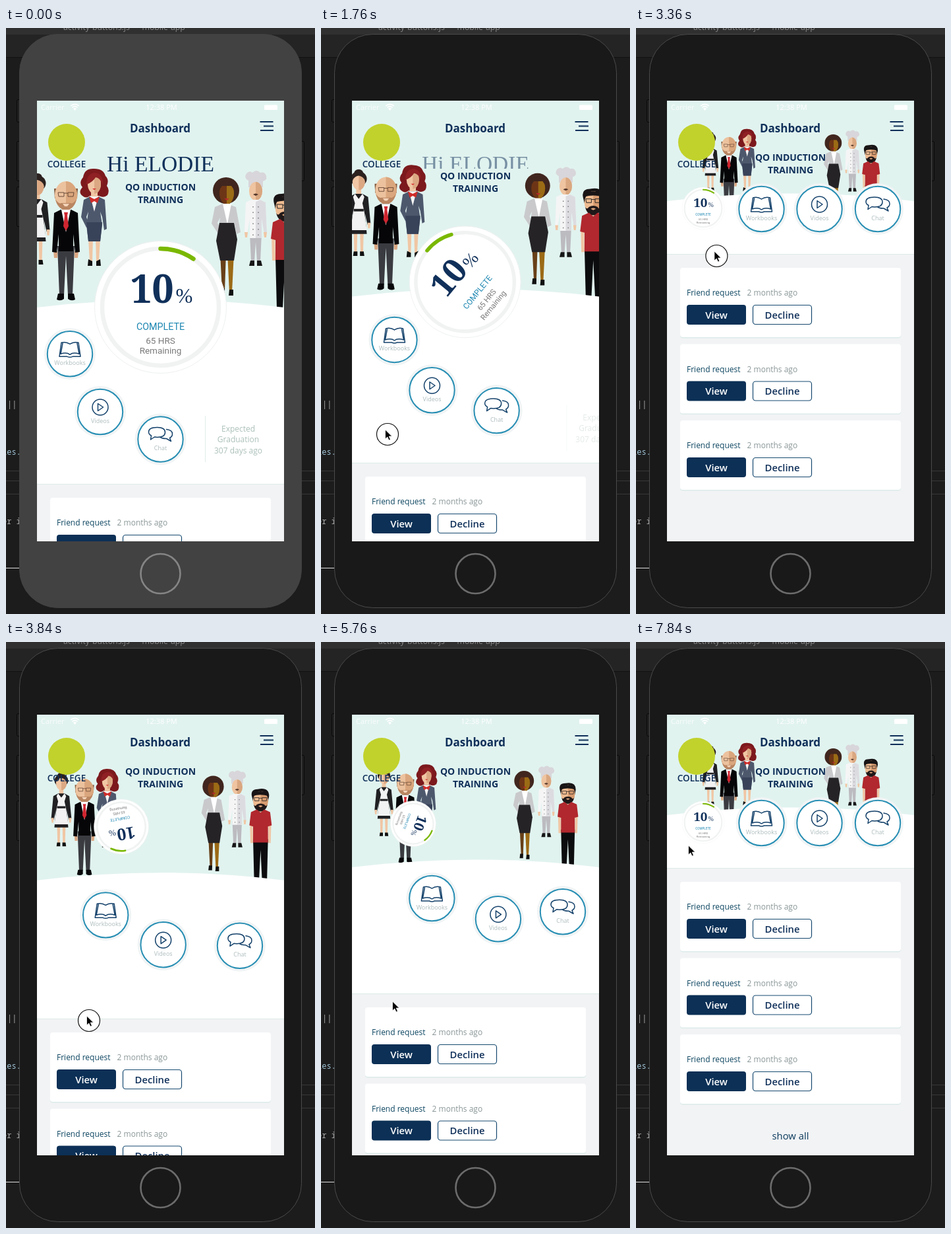
These frames come from a looping animation (469 px wide and 887 px high, 8000 ms). An HTML page:

```html
<!DOCTYPE html>
<html lang="en">
<head>
<meta charset="utf-8">
<title>Collapsing dashboard header</title>
<style>
html, body { margin: 0; width: 100%; height: 100%; overflow: hidden; background: #1c1c1c; }
svg { display: block; width: 100vw; height: 100vh; font-family: "Open Sans", "Noto Sans", sans-serif; }
.mid { text-anchor: middle; }
.navy { fill: #10305a; }
.bold { font-weight: 700; }
.mono { font: 12px "Noto Sans Mono", monospace; fill: #aaa; }
.serif { font-family: "Liberation Serif", serif; }
.digits { font-family: "Noto Serif", serif; }
.plain { font-family: Roboto, sans-serif; }
.line { fill: none; stroke: #15426b; stroke-width: 1.5; stroke-linejoin: round; stroke-linecap: round; }
</style>
</head>
<body>
<svg viewBox="0 0 469 887" preserveAspectRatio="none">
  <defs>
    <clipPath id="screen"><path d="M47 110h375v667H47z"/></clipPath>
    <clipPath id="greetClip"><rect id="greetRect" x="47" y="180" width="375" height="50"/></clipPath>
  </defs>

  <!-- editor window behind the phone -->
  <path fill="#1c1c1c" d="M0 0h469v887H0z"/>
  <path fill="#303030" d="M0 0h469v10H0z"/>
  <path fill="#242424" d="M0 10h469v34H0z"/>
  <path stroke="#111" d="M0 44.5h469"/>
  <path stroke="#383838" d="M0 670.5h469M0 685.5h469M0 705.5h469"/>
  <path stroke="#ddd" d="M0 817.5h21"/>
  <text x="87" y="2.500" font-size="12.300" fill="#888">activity-buttons.js — mobile-app</text>
  <g class="mono"><text x="2" y="574">||</text><text x="-6" y="646" fill="#9fc3d6">les.</text><text x="-6" y="751">er i</text></g>

  <!-- phone -->
  <g fill="#202020" stroke="#080808">
    <rect x="16.5" y="108.5" width="8" height="34" rx="2"/><rect x="16.5" y="171.5" width="8" height="60" rx="2"/>
    <rect x="16.5" y="240.5" width="8" height="60" rx="2"/><rect x="444.5" y="171.5" width="8" height="60" rx="2"/>
  </g>
  <rect id="bezel" x="20.5" y="9.5" width="428" height="868" rx="58"/>
  <circle id="home" cx="234.5" cy="826" r="30" fill="none" stroke-width="2.6"/>

  <g clip-path="url(#screen)">
    <path fill="#e1f3ef" d="M47 110h375v667H47z"/>
    <g id="left"></g>
    <g id="right"></g>
    <path id="hill" fill="#fff" d="M47 0Q234.5-23 422 0V700H47z"/>

    <g fill="#fff" font-size="11">
      <text x="53" y="124" opacity=".8">Carrier</text>
      <text x="236" y="124" class="mid">12:38 PM</text>
      <rect x="392" y="116.500" width="20" height="7.500" rx="1.500"/>
      <path d="M104.500 125l-2.500-3q2.500-2 5 0z"/>
      <path fill="none" stroke="#fff" stroke-width="1.700" d="M100.500 120.300q4-3.300 8 0M98.300 117.800q6.200-5 12.400 0"/>
    </g>
    <circle cx="92" cy="173" r="28" fill="#c1d22c"/>
    <text x="92" y="211" class="mid navy" font-size="13.500" font-weight="600">COLLEGE</text>
    <text x="234" y="158" class="mid navy bold" font-size="17">Dashboard</text>
    <path stroke="#10305a" stroke-width="2.200" d="M385.500 142h20M391 148.500h15M386 155h20"/>
    <g clip-path="url(#greetClip)"><text id="greet" x="234.500" y="217" class="mid navy serif" font-size="33.500">Hi ELODIE</text></g>
    <g id="course" class="mid navy bold" font-size="14"><text x="234.500" y="246">QO INDUCTION</text><text x="234.500" y="265">TRAINING</text></g>

    <g id="graduation" class="mid" font-size="12" fill="#abc0ba">
      <path stroke="#e0edea" d="M302.500 587v70"/>
      <text x="352.500" y="611">Expected</text><text x="352.500" y="627">Graduation</text><text x="352.500" y="644">307 days ago</text>
    </g>

    <g id="list">
      <path fill="#f2f3f5" d="M47 0h375v900H47z"/>
      <path stroke="#dcebe8" d="M47 .5h375"/>
      <g id="cards"></g>
      <text id="showAll" x="234.500" y="411" class="mid" font-size="14.800" fill="#0b3a5c">show all</text>
    </g>

    <g id="ring" class="mid">
      <circle r="100" fill="#fff" stroke="#eef0f0"/>
      <circle r="88.500" fill="none" stroke="#f1f2f2" stroke-width="6.500"/>
      <path d="M0-88.500A88.500 88.500 0 0 1 50-73" fill="none" stroke="#7ab800" stroke-width="6.500" stroke-linecap="round"/>
      <text x="-13" y="-7" class="navy bold digits" font-size="59">10</text>
      <text x="36" y="-7" class="navy serif" font-size="31">%</text>
      <g class="plain" fill="#7a7a7a" font-size="13.500">
        <text y="34" font-size="14.300" fill="#1c86b1">COMPLETE</text>
        <text y="55">65 HRS</text><text y="70.500">Remaining</text>
      </g>
    </g>
    <g id="icons"></g>
  </g>

  <g id="cursor">
    <circle id="press" r="16.500" fill="#fff" stroke="#111" stroke-width="1.200"/>
    <path d="M-3.500-7v14l3.300-3 2.300 5 2.300-1-2.200-4.900h4.500z" fill="#000" stroke="#fff" stroke-width=".8"/>
  </g>
</svg>

<script>
const $ = id => document.getElementById(id);
const shape = (fill, d) => `<path fill="${fill}" d="${d}"/>`;
const oval = (fill, x, y, rx, ry = rx) => `<ellipse cx="${x}" cy="${y}" rx="${rx}" ry="${ry}" fill="${fill}"/>`;
const person = (x, ...parts) => `<g transform="translate(${x})">${parts.join('')}</g>`;
const glasses = (y, color) => `<path fill="none" stroke="${color}" d="M-12 ${y}h9v6h-8zM12 ${y}h-9v6h8zM-3 ${y + 1}h6"/>`;
const face = (y, rx, ry, light, dark) => oval(light, 0, y, rx, ry) + shape(dark, `M0 ${y - ry}a${rx} ${ry} 0 0 1 0 ${2 * ry}z`);

const skin = '#f0c6a4', shade = '#dba883';

const maid = person(47.5,
  oval('#2b211f', 0, 225, 7, 5), oval('#2b211f', 0, 235, 13, 12),
  shape(skin, 'M-8 318h6l-1 36h-4zM8 318h-6l1 36h4zM-4 248H4v14h-8z'),
  face(240, 10, 13, skin, shade), shape('#2b211f', 'M-11 239q1-14 11-14t11 14q-4-8-11-9-7 1-11 9'),
  shape('#202023', 'M-6 259l-9 5-4 42 5 2 4-18-3 33h26l-3-33 4 18 5-2-4-42-9-5z'),
  shape('#f2f2f2', 'M-6 259l6 8 6-8 3 5-3 10 3 14 4 29h-26l4-29 3-14-3-10z'),
  shape('#202023', 'M-8 283H8v4H-8z'),
  shape(skin, 'M-19 305h5l-1 9h-3zM19 305h-5l1 9h3z'),
  shape('#111', 'M-8 351h6v7h-7zM8 351H2v7h7z'));

const suit = person(91,
  shape(shade, 'M-6 268H6v16H-6zM-19 338h6v10h-5zM19 338h-6v10h5z'),
  shape('#80583d', 'M-18 243h4v15h-3zM18 243h-4v15h3z'),
  face(253, 17, 21, '#ecc29e', '#daa67d'),
  shape('#b98561', 'M-16 259q3 15 16 17 13-2 16-17-5 8-9 6H-7q-4 2-9-6'),
  shape('#f3d3b8', 'M-5 266h10l-3 4h-4z'), glasses(249, '#6b4a38'),
  shape('#3a3b41', 'M-13 330h26l-3 74H3L0 345l-3 59h-7z'),
  shape('#060608', 'M-8 275l-10 5-3 59 7 1 3-28v26h22v-26l3 28 7-1-3-59-10-5z'),
  shape('#fff', 'M-7 275L0 309l7-34z'),
  shape('#cf2630', 'M-3 279h6l-1 5 2 16-4 7-4-7 2-16z'),
  shape('#08080a', 'M-12 402h9v8q-5 4-11 1zM12 402H3v8q5 4 11 1z'));

const redhead = person(134,
  shape('#7c191d', 'M0 213q-15-1-17 13-7 8-1 15-7 8 0 13 6 5 11 0H7q7 4 13-1 4-8-1-14 4-9-2-15-3-11-17-11'),
  shape(skin, 'M-5 243H5v20H-5zM-9 318h7l-1 36h-4zM9 318H2l1 36h4z'),
  face(236, 10, 15, skin, shade),
  shape('#8f2024', 'M-12 237q0-17 13-18 12 1 12 18-4-10-11-11-4 7-14 11'),
  shape('#d7262c', 'M-3 243h6l-3 2z'),
  shape('#4d586d', 'M-6 255l-10 5-4 26 8 16 4-3-4-13 3-8-3 20 3 25H9l3-25-3-20 3 8 3 20 4-2-3-44-10-5z'),
  shape('#384259', 'M-12 294h24l-3 29H-9z'),
  shape('#f6f6f6', 'M-6 255L0 278l6-23z'),
  shape('#cf2d2a', 'M-8 255l8 4 8-4-3 10-5-3-5 3z'),
  shape('#111', 'M-9 350l6 3v7h-7zM9 350l-6 3v7h7z'));

const business = person(335,
  oval('#40261e', -1, 246, 20),
  shape('#684018', 'M-5 256H5v16H-5zM-10 340h9l-2 58h-4z'), shape('#9c6a16', 'M1 340h10l-3 60H4z'),
  face(250, 11, 17, '#6d3516', '#9b6b15'),
  shape('#40261e', 'M-12 246q1-15 12-15t12 15l-5-7H-7z'), shape('#b7272a', 'M-4 258h8l-4 3z'),
  shape('#c9c9cc', 'M-6 266l-12 5-5 25 11 17 5-4-7-14 4-8-2 12h24l-2-12 5 25 6-3-7-38-14-5z'),
  shape('#fff', 'M-6 266L1 297l6-31z'),
  shape('#252326', 'M-11 295h22l5 25-5 32h-21l-6-30z'),
  shape('#111', 'M-9 394h6v9h-7zM4 396h6v9H3z'));

const chef = person(379,
  shape('#d8d6da', 'M-11 241v-10q-8-4-3-11 5-5 9-1 6-6 12 0 7-2 9 5 2 6-5 8v9z'),
  face(247, 10, 14, '#efc4a0', '#d9a780'), shape('#55392c', 'M-4 252q4-3 8 0l-4 2z'),
  shape('#bcbbc0', 'M-9 311H9l-2 43H2L0 324l-2 30h-5z'),
  shape('#f5f5f6', 'M-7 260l-8 4-2 46 4 1 4-22v29H9v-29l4 22 4-1-2-46-8-4z'),
  shape('#dcdce0', 'M0 263l7-3 8 4 2 46-4 1-4-22v29H0z'),
  `<path stroke="#777" stroke-width="1.500" stroke-dasharray="1.500 7" d="M-4 270v45M4 270v45"/>`,
  shape(skin, 'M-17 309h5l-1 8h-3zM17 309h-5l1 8h3z'),
  shape('#171717', 'M-8 352h6v8h-8zM8 352H2v8h8z'));

const casual = person(423,
  shape('#191516', 'M-16 266q-4-15 11-15 21-4 21 13l-2 10h-28z'),
  shape(shade, 'M-5 280H5v14H-5z'), face(273, 14, 18, '#eebb91', '#d89c70'),
  shape('#191516', 'M-15 264q2-9 15-9t15 9q-15-5-30 0'),
  shape('#201819', 'M-13 280q3 13 13 13t13-13q-3 5-6 0-7-4-14 0-3 5-6 0'),
  shape('#dfa77e', 'M-4 283q4-3 8 0l-4 2z'), glasses(267, '#222'),
  shape(skin, 'M-20 315h5l1 37h-5zM20 315h-5l-1 37h5z'),
  shape('#0c0c0e', 'M-14 345h28l-2 80H3l-3-60-3 60h-9z'),
  shape('#b1282e', 'M-7 289l-11 5-3 25 7 2v30h28v-30l7-2-3-25-11-5-7 6z'));

$('left').innerHTML = maid + redhead + suit;
$('right').innerHTML = chef + business + casual;

$('cards').innerHTML = [0, 1, 2].map(i => `<g transform="translate(0 ${21 + i * 115.5})">
  <rect x="67" y="1.500" width="335" height="105" rx="4" fill="#dcebea"/>
  <rect x="67" width="335" height="105" rx="4" fill="#fff"/>
  <g font-size="12"><text x="77" y="42" fill="#0d4661">Friend request</text><text x="168.500" y="42" fill="#8a9697">2 months ago</text></g>
  <rect x="77" y="56" width="90" height="30" rx="4" fill="#0c3056"/>
  <rect x="177.500" y="56.500" width="89" height="29" rx="4" fill="#fff" stroke="#174a70" stroke-width="1.200"/>
  <g class="mid" font-size="14.800" font-weight="600"><text x="122" y="76.500" fill="#fff">View</text><text x="222" y="76.500" class="navy">Decline</text></g>
</g>`).join('');

const icon = (label, art) => `<g><circle r="39" fill="#f1f4f5"/><circle r="34.200" fill="#fff" stroke="#278eb3" stroke-width="2"/>
  <g class="line">${art}</g><text y="16.500" class="mid" font-size="9" fill="#aebcbd">${label}</text></g>`;
$('icons').innerHTML =
  icon('Workbooks', '<path d="M0-15Q-6-19-13-17L-16 4H-4Q0 6 4 4H16L13-17Q6-19 0-15M-11-16l-3 16Q-5-3 0 1 5-3 14 0L11-16"/>') +
  icon('Videos', '<circle cy="-7" r="12"/><path d="M-3.500-12.500v11l8-5.500z"/>') +
  icon('Chat', `<path d="M9-15q9 1 9 7 0 4-4 6l2 5-7-4Q1-1-1-4"/>
    <path fill="#fff" d="M-5-18q12 0 12 7.500T-5-3l-4-.5-6 4 1-6q-4-2-4-5.500 0-7 13-7z"/>`);

// Piecewise-linear value from a flat list: x0, y0, x1, y1, ...
function track(x, ...p) {
  if (x <= p[0]) return p[1];
  for (let i = 2; i < p.length; i += 2)
    if (x < p[i]) return p[i - 1] + (p[i + 1] - p[i - 1]) * (x - p[i - 2]) / (p[i] - p[i - 2]);
  return p[p.length - 1];
}
const place = (el, x, y, more = '') => el.setAttribute('transform', `translate(${x} ${y}) ${more}`);

function layout(s) {
  const size = 1 - Math.min(s, 222) * .0016;
  const feet = track(s, 0, 412, 158, 334, 225, 303, 345, 281);
  place($('left'), track(s, 0, 91, 158, 128, 215, 141), feet, `scale(${size}) translate(-91 -412)`);
  place($('right'), track(s, 0, 335, 158, 309, 213, 300), feet, `scale(${size}) translate(-335 -412)`);
  place($('hill'), 0, track(s, 0, 423, 158, 341, 345, 262));

  const lift = track(s, 0, 0, 85, 45);
  place($('course'), 0, -lift);
  $('greetRect').setAttribute('height', 50 - lift);
  $('greet').setAttribute('opacity', track(s, 0, 1, 64, 0));
  $('graduation').setAttribute('opacity', track(s, 0, 1, 48, 0));
  place($('graduation'), 2.2 * s, -.52 * s);

  place($('ring'), track(s, 0, 234.5, 120, 175, 199, 102), track(s, 0, 422.5, 120, 279.5, 158, 275, 225, 273),
    `rotate(${track(s, 0, 0, 228, -360)}) scale(${track(s, 0, 1, 120, .415, 158, .345, 225, .32)})`);
  const [books, videos, chat] = $('icons').children;
  place(books, track(s, 0, 97, 207, 190.5), track(s, 0, 493.3, 158, 388, 345, 286, 348, 274));
  place(videos, track(s, 0, 143, 170, 278.5), track(s, 0, 581, 300, 274));
  place(chat, track(s, 0, 234.5, 132, 367), track(s, 0, 622.5, 257, 274));
  place($('list'), 0, 690 - s);
}

function draw(t) {
  layout(track(t, 1600, 0, 1760, 32, 2080, 167, 2240, 270, 2400, 345, 2560, 348,
    3360, 348, 3840, 120, 4000, 45, 4160, 0,
    5440, 0, 5600, 60, 5760, 158, 5920, 240, 6080, 295, 6400, 340, 6720, 348));

  const focused = t >= 1440;
  $('bezel').setAttribute('fill', focused ? '#191919' : '#424242');
  $('bezel').setAttribute('stroke', focused ? '#4a4a4a' : '#424242');
  $('home').setAttribute('stroke', focused ? '#6c6c6c' : '#858585');
  $('showAll').style.display = t >= 7200 ? '' : 'none';

  const during = (a, b) => t >= a && t < b;
  $('cursor').style.display = focused ? '' : 'none';
  $('press').style.display = during(1600, 2240) || during(3360, 4160) || during(5440, 5700) ? '' : 'none';
  place($('cursor'),
    track(t, 1760, 101, 2400, 107, 3040, 120, 3840, 126, 4800, 105, 5440, 105, 5760, 112, 7840, 83),
    track(t, 1600, 647, 1760, 615, 2080, 480, 2240, 425, 2400, 411, 3040, 345, 3360, 345, 3840, 573,
      4160, 680, 4800, 642, 5440, 642, 5760, 551, 6720, 400, 7840, 315));
}

const STEP = 160, LOOP = 8000;
function tick() {
  draw(Math.floor(performance.now() % LOOP / STEP) * STEP);
  requestAnimationFrame(tick);
}
tick();
</script>
</body>
</html>
```
